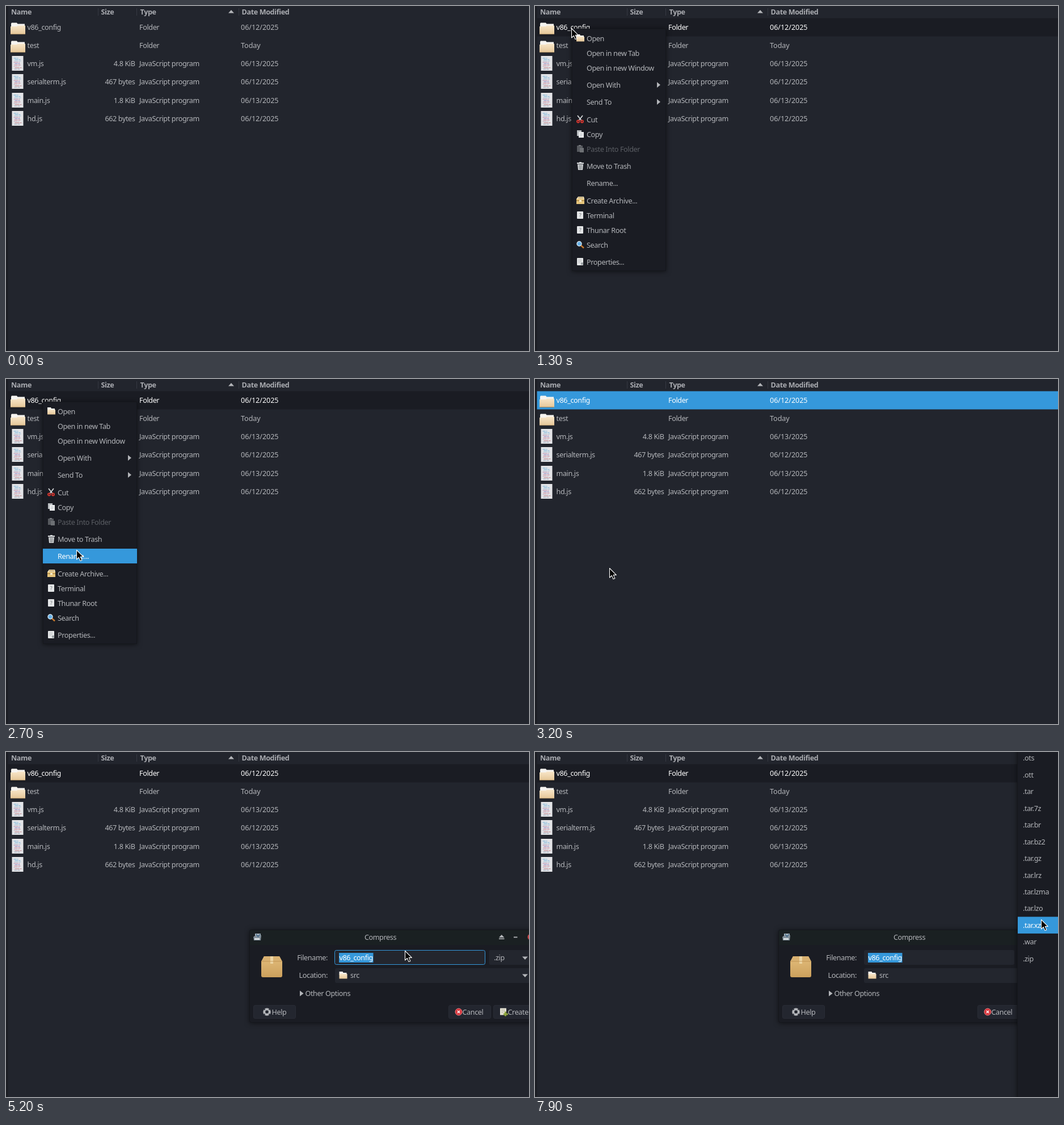
These frames come from a looping animation (922x608 px, 8 s). An HTML page:

```html
<!DOCTYPE html>
<html lang="en">
<head>
<meta charset="utf-8">
<title>File manager</title>
<style>
html, body { margin: 0; width: 100%; height: 100%; overflow: hidden; background: #22252d; }
svg { display: block; }
text { font: 12.6px "Noto Sans", sans-serif; letter-spacing: -.38px; fill: #b4b6ba; white-space: pre; }
.head { font-weight: bold; fill: #a9abb0; }
.num { letter-spacing: -.05px; }
.end { text-anchor: end; }
.mid { text-anchor: middle; }
.off { fill: #5b5e64; }
.on, .on text { fill: #fff; }
</style>
</head>
<body>
<svg id="stage" width="922" height="608" viewBox="0 0 922 608"></svg>
<script>
const BLUE = '#3598db', BG = '#22252d', DARK = '#1a1c23', GREY = '#b4b6ba';
const LOOP = 8000, TICK = 100;

const text = (x, y, s, c = '') => `<text x="${x}" y="${y}" class="${c}">${s}</text>`;
const rect = (x, y, w, h, fill, more = '') =>
  `<rect x="${x}" y="${y}" width="${w}" height="${h}" fill="${fill}" ${more}/>`;
const path = (d, fill = GREY, more = '') => `<path d="${d}" fill="${fill}" ${more}/>`;
const line = (d, stroke, w = 1) => path(d, 'none', `stroke="${stroke}" stroke-width="${w}"`);
const ring = (x, y, r, fill, more = '') => `<circle cx="${x}" cy="${y}" r="${r}" fill="${fill}" ${more}/>`;
const group = (id, s) => `<g id="${id}">${s}</g>`;
const at = (x, y, s) => `<g transform="translate(${x} ${y})">${s}</g>`;

// File list
const ROW = 32.15;
const files = [
  ['v86_config', '', 'Folder', '06/12/2025'],
  ['test', '', 'Folder', 'Today'],
  ['vm.js', '4.8 KiB', 'JavaScript program', '06/13/2025'],
  ['serialterm.js', '467 bytes', 'JavaScript program', '06/12/2025'],
  ['main.js', '1.8 KiB', 'JavaScript program', '06/13/2025'],
  ['hd.js', '662 bytes', 'JavaScript program', '06/12/2025'],
];

const bigFolder = path('M1 8V2L2 .5H11L12.5 2.5H25V8Z', '#f6f4f0') +
  path('M0 7H11L13 5.5H26V20Q26 21 25 21H1Q0 21 0 20Z', 'url(#tan)') +
  line('M.5 20.6H25.5', '#8f7550', .8);
const smallFolder = path('M0 0H6L7 2H13V5H0Z', '#f5f2ec') + rect(0, 4, 14, 8.5, 'url(#tan)', 'rx=".6"');

function scriptIcon() {
  const hues = ['#4a9fd0', '#58a8d8', '#8fb7cf', '#b0709c', '#7a6bb5', '#c2607c', '#b9a0b4', '#b8656f', '#7f8fa8'];
  return rect(0, 0, 20, 26, '#e4e5e8') + hues.map((c, i) =>
    line(`M${3 + i * 2 % 3} ${4 + i * 2.4}h${5 + i * 5 % 4}m1 0h${2 + i % 3}`, c, .8)).join('');
}

function fileRow([name, size, type, date], i) {
  const y = Math.round(42 + ROW * i);
  const icon = i < 2 ? at(8, y - 13, bigFolder) : at(10.5, y - 18, scriptIcon());
  return `<g class="row"><g class="icon">${icon}</g>` + text(37.5, y, name) + text(227.5, y, size, 'end') +
    text(235, y, type) + text(414, y, date, 'num') + '</g>';
}

const header = text(9, 15, 'Name', 'head') + text(167.5, 15, 'Size', 'head') +
  text(236.5, 15, 'Type', 'head') + text(415.5, 15, 'Date Modified', 'head') +
  path('M392 12.5L397 7L402 12.5Z') +
  [162, 230, 410].map(x => rect(x, 4, 1, 13, '#363942')).join('');

// Context menu
const page = rect(1, 0, 11, 13, '#e4e6e7', 'rx="1"');
const ask = page + text(6.5, 10, '?', 'mid').replace('<text', '<text style="font-size:9px;fill:#6f7478"');
const icons = {
  folder: smallFolder,
  cut: line('M2 0L9 9M11 0L4 9', '#d9dcde', 1.7) + ring(3, 10.5, 2, 'none', 'stroke="#d8362f" stroke-width="1.9"') +
    ring(10, 10.5, 2, 'none', 'stroke="#d8362f" stroke-width="1.9"'),
  copy: rect(1, 0, 8, 10, '#b9bdc0') + rect(4, 3, 9, 10, '#eceeef') + line('M6 6h5M6 8h5M6 10h4', '#b4b8bb', .7),
  paste: rect(1, 1, 10, 11, '#56595e') + rect(4, 0, 4, 2, '#777a7e') + rect(6, 5, 7, 8, '#6d7074'),
  trash: rect(1, 1, 12, 2.2, '#dadddf') + rect(5, 0, 4, 1.5, '#dadddf') + path('M2 4H12L11 14H3Z', '#cfd2d4') +
    line('M5 5L5.5 13M7 5V13M9 5L8.5 13', '#797e82', .9),
  pack: path('M0 4L3 0H13L14 4Z', '#f7e8c0') + rect(0, 4, 14, 9, '#e6c57c') +
    line('M0 7H14M3 2H12', '#8c6724', 1.2) + rect(5, 6, 4, 3, '#f7edcf'),
  ask,
  find: line('M8 8L13 12.5', '#c8792c', 2.4) + ring(5, 5, 4, '#67b1e7', 'stroke="#d8e8f2" stroke-width="1.4"'),
  info: page + line('M3 3h6M3 5.5h6M3 8h4', '#b0b4b7', .8) + ring(10, 10, 2.3, '#9aa0a4'),
};
const menuItems = [
  [57, 'Open', 'folder'], [83, 'Open in new Tab'], [109, 'Open in new Window'],
  [139, 'Open With', '', 1], [169, 'Send To', '', 1], [200, 'Cut', 'cut'], [226, 'Copy', 'copy'],
  [252, 'Paste Into Folder', 'paste'], [282, 'Move to Trash', 'trash'], [312, 'Rename...'],
  [343, 'Create Archive...', 'pack'], [369, 'Terminal', 'ask'], [395, 'Thunar Root', 'ask'],
  [421, 'Search', 'find'], [451, 'Properties...', 'info'],
];
const menuItem = ([y, label, icon, sub]) => '<g class="item">' + (icon ? at(73, y - 7, icons[icon]) : '') +
  text(91, y + 5, label, icon === 'paste' ? 'off' : '') +
  (sub ? path(`M215 ${y - 5}L221 ${y}L215 ${y + 5}Z`) : '') + '</g>';

// Compress dialog
const EDGE = 'stroke="#15171c" filter="url(#shade)"';
const field = (x, y, w) => rect(x, y, w, 26, '#23262e', 'rx="3"');
const down = y => path(`M910 ${y}H920L915 ${y + 5.5}Z`);
const button = (x, w) => rect(x + .5, 446.5, w, 23, '#23262f', 'rx="2.5" stroke="#292c35"');
const dialog =
  rect(429.5, 313.5, 520, 163, DARK, `rx="3" ${EDGE}`) +
  path('M430 340V317Q430 314 433 314H922V340Z', '#1a2022') +
  at(436, 319, path('M3 1H13V10H3Z', '#a9b6bd') + path('M0 7L4 4H14L13 13H1Z', '#82909a') +
    rect(2, 9, 9, 3, '#d5dcdf') + line('M5 2L9 7M12 2L8 6', '#3a6386', 1.3)) +
  text(660, 330.5, 'Compress', 'mid') +
  path('M869 327H878.5L873.7 322Z') + rect(869, 328.4, 9.5, 1.6, GREY) + rect(895, 325.5, 6.5, 1.8, GREY) +
  ring(925, 326, 5.5, '#c9474c') +
  at(450, 360, path('M5 0H32L37 9V34Q37 37 34 37H3Q0 37 0 34V9Z', 'url(#box)') +
    path('M5 0H32L36.5 9H.5Z', '#d9b171') + rect(16, 0, 5, 13, '#ecd5a4') + line('M.5 9H36.5', '#b98d4d', .8)) +
  text(567, 367, 'Filename:', 'end') + text(567, 398, 'Location:', 'end') +
  field(580, 349, 265) + rect(587, 354, 60.5, 17, BLUE) + text(587.5, 367, 'v86_config', 'on') +
  field(851.5, 349, 90) + text(860, 367, '.zip') + down(360.5) +
  field(580, 381, 370) + at(587.5, 387, smallFolder) + text(607, 398, 'src') + down(391.5) +
  path('M518 420.5L524.5 425.5L518 430.5Z') + text(527.5, 430, 'Other Options') +
  button(436, 74) + ring(460, 458, 4.8, 'none', `stroke="${GREY}" stroke-width="4"`) +
  line('M456.5 454.5l-2 -2M463.5 454.5l2 -2M456.500 461.5l-2 2M463.5 461.5l2 2', '#2b2e37', 1.8) +
  text(468.5, 462.5, 'Help') +
  button(780, 74) + ring(798, 458, 6, '#d8333a', 'stroke="#ee8286"') +
  line('M795.7 455.7l4.6 4.6m0-4.6l-4.6 4.6', '#fff', 1.4) + text(804.5, 462.5, 'Cancel') +
  button(859, 90) + at(870, 451.5, rect(1, 0, 11, 12, '#e6e3d5') + line('M3 3h7M3 5.5h7M3 8h4', '#a8a794', .8) +
    path('M9 6h3v3h3v3h-3v2H9v-2H7V9h2Z', '#8da33d')) + text(884.5, 462.5, 'Create');

// Archive format list
const STEP = 29.46, LIST_TOP = -4.2;
const formats = '.ots .ott .tar .tar.7z .tar.br .tar.bz2 .tar.gz .tar.lrz .tar.lzma .tar.lzo .tar.xz .war .zip'.split(' ');
const formatItem = (s, i) => `<g class="format">${text(860, Math.round(15.3 + STEP * i), s)}</g>`;

const $ = id => document.getElementById(id);
$('stage').innerHTML = `<defs>
  <linearGradient id="tan" x2="0" y2="1"><stop stop-color="#f8e6c9"/><stop offset="1" stop-color="#e5c697"/></linearGradient>
  <linearGradient id="box" x2="0" y2="1"><stop stop-color="#e3bd7c"/><stop offset="1" stop-color="#cba05c"/></linearGradient>
  <filter id="shade" x="-20%" y="-20%" width="140%" height="140%" color-interpolation-filters="sRGB">
    <feDropShadow dx="0" dy="1" stdDeviation="4" flood-color="#000" flood-opacity=".55"/></filter>
  </defs>` +
  rect(0, 0, 922, 608, BG) + rect(0, 0, 3.5, 608, '#1b1d23') + header +
  rect(3.5, 21.5, 919, 32, BLUE, 'id="pick"') + files.map(fileRow).join('') +
  group('menu', rect(65.5, 40.5, 165, 426, DARK, EDGE) +
    rect(65, 0, 166, 26, BLUE, 'id="menuBar"') + menuItems.map(menuItem).join('')) +
  group('dialog', dialog + rect(579.5, 349.5, 265, 25, 'none', `id="focus" rx="3" stroke="${BLUE}"`)) +
  group('list', rect(850.5, -10, 90, 640, DARK, EDGE) +
    rect(851, 0, 72, 29.5, BLUE, 'id="listBar"') + formats.map(formatItem).join('')) +
  group('cursor', path('M.5 .5V17L4.3 13.4L7 19.6L9.8 18.4L7.2 12.400H12.3Z', '#000',
    'stroke="#fff" stroke-width="1.1" stroke-linejoin="round"'));

const rows = [...document.querySelectorAll('.row')];
const items = [...document.querySelectorAll('.item')];
const formatRows = [...document.querySelectorAll('.format')];

// Pointer stops: time, x, y
const stops = [
  [200, 466, 521], [400, 300, 330], [600, 160, 150], [800, 85, 60], [1000, 64, 39],
  [1900, 64, 39], [2000, 70, 55], [2200, 88, 109], [2500, 112, 240], [2800, 130, 331], [2900, 131, 333],
  [3200, 131, 333], [3500, 245, 325], [3900, 448, 312], [4000, 485, 315], [4300, 564, 326],
  [5100, 564, 328], [5200, 703, 350], [5400, 800, 358], [5700, 903, 364], [5900, 902, 361],
  [7500, 902, 361], [7600, 901, 354], [7700, 898, 336], [7800, 895, 314], [7900, 892, 295], [8000, 892, 295],
];

function pointer(t) {
  const i = Math.max(1, stops.findIndex(s => s[0] >= t));
  const [t0, x0, y0] = stops[i - 1], [t1, x1, y1] = stops[i];
  const k = Math.max(0, (t - t0) / (t1 - t0));
  return [Math.round(x0 + (x1 - x0) * k), Math.round(y0 + (y1 - y0) * k)];
}

const show = (id, on) => $(id).setAttribute('visibility', on ? 'visible' : 'hidden');
const mark = (list, n) => list.forEach((el, i) => el.classList.toggle('on', i === n));
const between = (t, a, b) => t >= a && t < b;

function draw(now) {
  const t = Math.floor(now % LOOP / TICK) * TICK;
  const [x, y] = pointer(t);
  const menu = between(t, 1300, 3100), box = t >= 3600, list = t >= 6300;

  show('cursor', t >= 200);
  $('cursor').setAttribute('transform', `translate(${x} ${y})`);

  show('pick', t >= 1100);
  $('pick').setAttribute('fill', menu || box ? DARK : BLUE);
  mark(rows, t >= 1100 ? 0 : -1);
  const over = t >= 200 && !menu && !box ? Math.floor((y - 21.5) / ROW) : -1;
  rows.forEach((r, i) => r.firstChild.style.filter = i === over ? 'brightness(1.06)' : '');

  const hit = menu ? menuItems.findIndex(m => Math.abs(y - m[0]) <= 13) : -1;
  show('menu', menu);
  show('menuBar', hit >= 0);
  if (hit >= 0) $('menuBar').setAttribute('y', menuItems[hit][0] - 13);
  mark(items, hit);

  show('dialog', box);
  show('focus', box && !list);

  const n = Math.floor((y - LIST_TOP) / STEP);
  show('list', list);
  show('listBar', list);
  $('listBar').setAttribute('y', LIST_TOP + n * STEP);
  mark(formatRows, n);
}

const start = performance.now();
function loop() {
  draw(performance.now() - start);
  requestAnimationFrame(loop);
}
loop();
</script>
</body>
</html>
```
